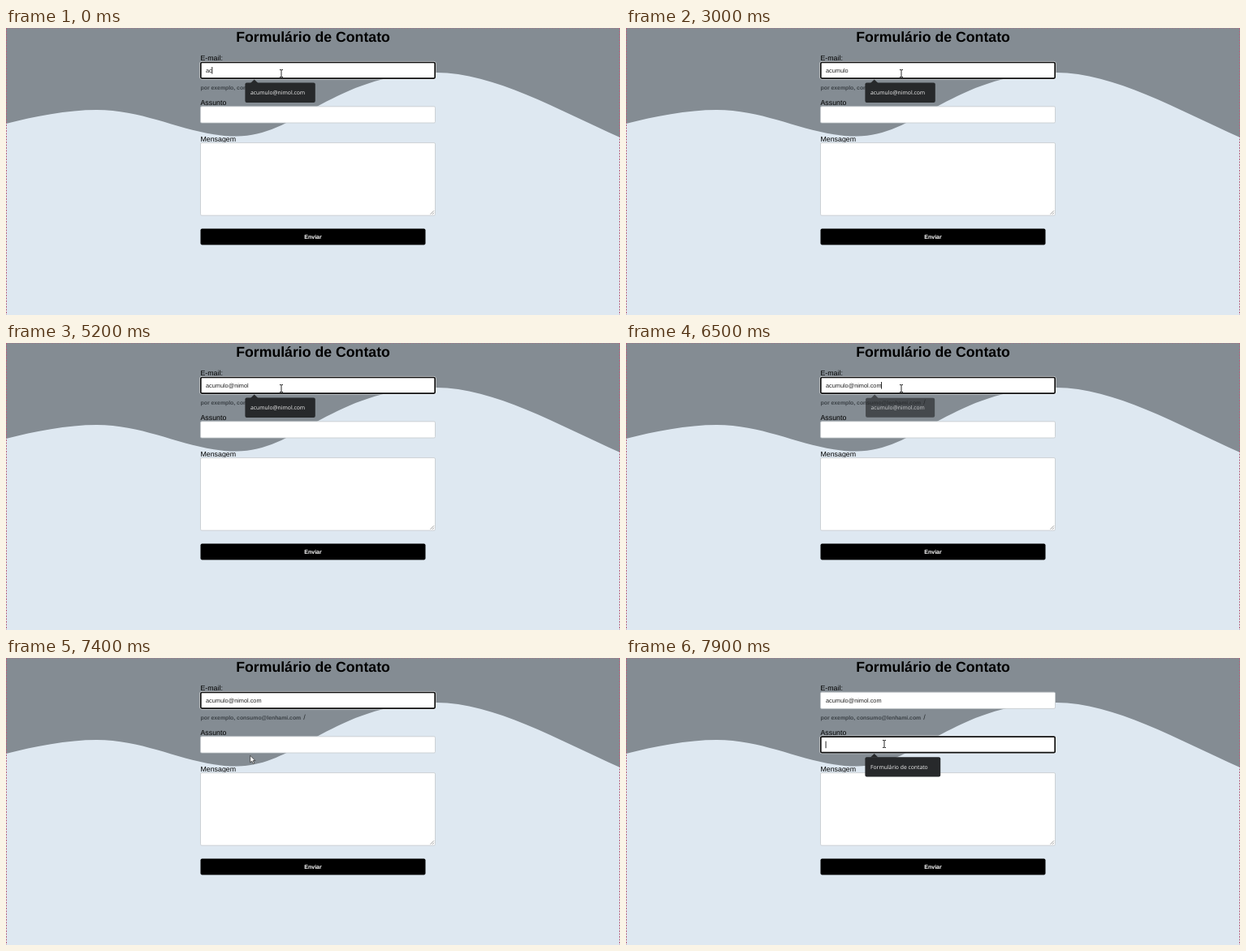
An HTML page for the animation above (8 s loop, 756 by 354 pixels).

```html
<!DOCTYPE html>
<html lang="pt">
<head>
<meta charset="utf-8">
<title>Formulário de Contato</title>
<style>
html, body { margin: 0; width: 100%; height: 100%; overflow: hidden; background: #dee8f1; }
svg { display: block; font: 8.8px "Liberation Sans", Arial, sans-serif; text-rendering: geometricPrecision; }
.field { fill: #fff; stroke: #c3c8cc; stroke-width: .8; }
.small { font-size: 7.33px; fill: #222; }
.tip { font: 6.8px "Open Sans", "Noto Sans", sans-serif; fill: #f2f2f2; }
.edge { fill: none; stroke: #b8607c; stroke-dasharray: 2 1.5; }
</style>
</head>
<body>
<svg width="756" height="354" viewBox="0 0 756 354">
  <path fill="#848c93" d="M0 0V118C35 109 75 101 112 101C175 101 225 133.5 284 133.5C358 133.5 405 55 530 55C600 55 680 101 756 135V0Z"/>
  <path class="edge" d="M.5 0V354M755.5 0V354"/>
  <path class="edge" opacity=".35" d="M0 .5H756"/>

  <text x="378" y="16.6" font-size="17.7" font-weight="bold" text-anchor="middle">Formulário de Contato</text>
  <text x="239.5" y="39.8">E-mail:</text>
  <text x="239.5" y="75.8" font-size="6.86" font-weight="bold" fill="#3c4247">por exemplo, consumo@lenhami.com</text>
  <text x="366.3" y="75.8" fill="#24282b">/</text>
  <text x="239.5" y="94.5">Assunto</text>
  <rect class="field" x="239.5" y="42.2" width="289" height="20.2" rx="1.5"/>
  <rect class="field" x="239.5" y="96.8" width="289" height="20.2" rx="1.5"/>
  <text x="239.5" y="139.5">Mensagem</text>
  <rect class="field" x="239.5" y="141.6" width="289" height="89.6" rx="1.5"/>
  <path d="M522.5 229.8L527 225.3M525 229.8L527 227.8" stroke="#777" stroke-width=".7"/>
  <rect x="239.5" y="247.6" width="277" height="19.8" rx="2"/>
  <text x="378" y="260" font-size="7.04" font-weight="bold" fill="#fff" text-anchor="middle">Enviar</text>

  <g id="ring" fill="none">
    <rect x="238.7" y="41.4" width="290.6" height="21.8" rx="2.5" stroke="#fff" stroke-opacity=".6"/>
    <rect x="239.8" y="42.5" width="288.4" height="19.6" rx="1.5" stroke="#101010" stroke-width="1.7"/>
  </g>
  <text id="mail" class="small" x="246" y="54.8"></text>
  <rect id="caret" width=".9" height="8.6" fill="#111"/>

  <g id="mailTip">
    <path fill="#27292b" d="M301 68L305.7 63.4L310.4 68Z"/>
    <rect x="294.4" y="67.6" width="86.4" height="24.4" rx="2" fill="#27292b"/>
    <text class="tip" x="301" y="82.3">acumulo@nimol.com</text>
  </g>
  <g id="topicTip">
    <path fill="#27292b" d="M301 122.6L305.7 118L310.4 122.6Z"/>
    <rect x="294.4" y="122.2" width="92.8" height="24.4" rx="2" fill="#27292b"/>
    <text class="tip" x="301" y="136.9">Formulário de contato</text>
  </g>

  <path id="beam" fill="none" stroke="#111" stroke-width=".9" d="M-2 -4.5H-.7L0 -4L.7 -4.5H2M0 -4V4M-2 4.5H-.7L0 4L.7 4.5H2"/>
  <path id="arrow" fill="#fff" stroke="#222" stroke-width=".7" d="M0 0V8.6L2 6.8L3.5 10.1L4.9 9.5L3.5 6.3H6.2Z"/>
</svg>
<script>
const $ = id => document.getElementById(id);
const ADDRESS = "acumulo@nimol.com";
// [time, letters typed]
const TYPING = [[0, 2], [1000, 3], [1200, 4], [2000, 5], [2300, 6], [2400, 7], [3500, 8], [4400, 10],
  [4700, 11], [4800, 12], [5000, 13], [5700, 14], [6000, 15], [6100, 16], [6300, 17]];
const CARET_OFF = [[3000, 3500], [4000, 4400], [5200, 5700], [7000, 7900]];
// [time, x, y]
const MOUSE = [[6900, 339, 56], [7400, 300.7, 120.3], [7800, 318, 106]];

const clamp = v => Math.max(0, Math.min(1, v));
const between = (v, a, b) => v >= a && v < b;
const show = (id, on) => $(id).style.display = on ? "" : "none";
const move = (id, x, y) => $(id).setAttribute("transform", `translate(${x} ${y})`);

function mouseAt(t) {
  let [, x, y] = MOUSE[0];
  for (let i = 1; i < MOUSE.length; i++) {
    const [t0, x0, y0] = MOUSE[i - 1], [t1, x1, y1] = MOUSE[i];
    if (t < t0) break;
    const u = clamp((t - t0) / (t1 - t0)), e = u * u * (3 - 2 * u);
    x = x0 + (x1 - x0) * e;
    y = y0 + (y1 - y0) * e;
  }
  return [x, y];
}

function draw(t) {
  const onTopic = t >= 7900;
  const count = TYPING.filter(k => k[0] <= t).pop()[1];
  $("mail").textContent = ADDRESS.slice(0, count);

  const caretX = 246 + (onTopic ? 0 : $("mail").getComputedTextLength());
  move("caret", caretX - .4, onTopic ? 102.6 : 48);
  show("caret", !CARET_OFF.some(([a, b]) => between(t, a, b)));
  show("ring", t < 7800 || onTopic);
  move("ring", 0, onTopic ? 54.6 : 0);

  const alpha = clamp((6700 - t) / 300), s = .955 + .045 * alpha;
  $("mailTip").setAttribute("opacity", alpha);
  $("mailTip").setAttribute("transform", `translate(337.6 78) scale(${s}) translate(-337.6 -78)`);
  show("topicTip", onTopic);

  const [x, y] = mouseAt(t);
  const overField = between(y, 42, 63) || between(y, 96, 118);
  move("beam", x, y);
  move("arrow", x, y);
  show("beam", overField);
  show("arrow", !overField);
}

function tick() {
  draw(Math.floor(performance.now() % 8000 / 100) * 100);
  requestAnimationFrame(tick);
}
tick();
</script>
</body>
</html>
```
